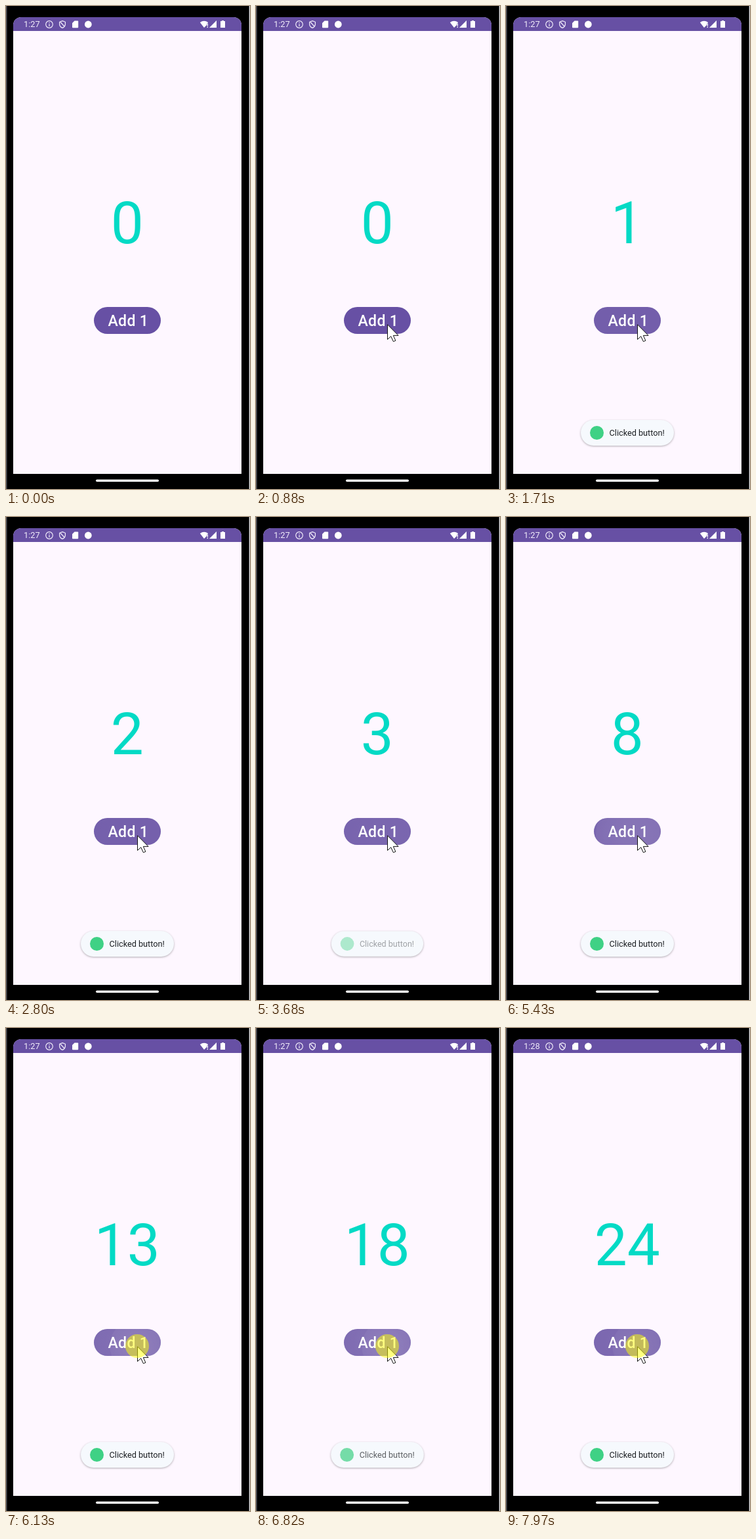
An HTML page that plays this animation: 372x735 px, repeating every 8 s.

```html
<!DOCTYPE html>
<html lang="en">
<head>
<meta charset="utf-8">
<title>Tap counter</title>
<style>
  html, body { margin: 0; width: 100%; height: 100%; overflow: hidden; background: #000; }
  svg { display: block; width: 372px; height: 735px; font-family: Roboto, sans-serif; }
  #count { font-size: 89px; fill: #03dac5; text-anchor: middle; }
  #clock { font-size: 12.8px; fill: #f1ecfa; }
  .label { font-size: 23px; font-weight: 500; letter-spacing: .3px; fill: #fff; }
  .message { font-size: 12.7px; fill: #1b1e21; }
  #toast { transform-origin: 185px 649.5px; }
  .pill { fill: #f6f9fd; filter: drop-shadow(0 1.5px 1.5px rgba(0, 0, 0, .3)); }
</style>
</head>
<body>
<svg viewBox="0 0 372 735">
  <defs>
    <clipPath id="screen"><path d="M11 712V29a12 12 0 0 1 12-12H347a12 12 0 0 1 12 12V712Z"/></clipPath>
    <clipPath id="button"><rect x="134" y="458" width="102" height="41" rx="20.5"/></clipPath>
    <radialGradient id="soft">
      <stop offset=".3" stop-color="#fff"/>
      <stop offset="1" stop-color="#fff" stop-opacity=".6"/>
    </radialGradient>
  </defs>

  <rect width="372" height="735"/>
  <rect width="1.5" height="735" fill="#55555a"/>
  <rect x="370.7" width="1.3" height="735" fill="#e4e4e6"/>
  <g clip-path="url(#screen)">
    <rect x="11" y="17" width="348" height="695" fill="#fef7ff"/>
    <rect x="11" y="17" width="348" height="21" fill="#6750a4"/>
  </g>
  <rect x="137" y="720.5" width="96" height="3.5" rx="1.75" fill="#f4f4f4"/>

  <!-- status bar -->
  <text id="clock" x="27" y="32.3">1:27</text>
  <g fill="none" stroke="#f1ecfa" stroke-width="1.2">
    <circle cx="66" cy="28" r="5.3"/>
    <path d="M66 27.2V31M66 24.7V26"/>
    <path d="M86 22.6L90.4 24.3V27.6Q90.2 31.7 86 33.4Q81.8 31.7 81.6 27.6V24.3ZM83 24.5L89 31"/>
  </g>
  <g fill="#fff">
    <path d="M104.5 22.5H109.2Q110.2 22.5 110.2 23.5V32.3Q110.2 33.3 109.2 33.3H102Q101 33.3 101 32.3V26Z"/>
    <circle cx="125.3" cy="28" r="5.4"/>
    <path d="M295.8 25Q302 20.5 308.2 25L306 27.7V29L302 33Z"/>
    <path d="M306.6 26.7H308V30.6H306.6ZM306.6 31.6H308V33H306.6Z"/>
    <path d="M321 22V33H310Z"/>
    <path d="M329 23V22H332V23H334V33H327V23Z"/>
  </g>

  <text id="count" x="184.8" y="361.3">0</text>

  <g clip-path="url(#button)">
    <rect x="134" y="458" width="102" height="41" fill="#6750a4"/>
    <rect id="hover" x="134" y="458" width="102" height="41" fill="#fff"/>
    <g id="ripples" fill="url(#soft)"></g>
  </g>
  <text class="label" x="155.5" y="487.2">Add 1</text>

  <g id="toast">
    <rect class="pill" x="114" y="630" width="142" height="39" rx="19.5"/>
    <g id="content">
      <circle cx="138.5" cy="649.5" r="10.5" fill="#3fd185"/>
      <text class="message" x="157.6" y="654.3">Clicked button!</text>
    </g>
  </g>

  <path id="cursor" d="M.5 .8V23.4L5.7 18.6 9.4 26.6 12.8 25.2 9.3 17.4H17Z"
        fill="#fff" stroke="#111" stroke-width="1"/>
  <circle id="press" cx="200" cy="484" r="18" fill="#ff0" fill-opacity=".5"/>
</svg>
<script>
  const LOOP = 8000;
  const $ = id => document.getElementById(id);
  const clamp = x => Math.min(1, Math.max(0, x));
  const show = (el, on) => el.setAttribute('visibility', on ? 'visible' : 'hidden');

  // Evenly spaced clicks: the moment the counter changes, and the press around it
  const run = (n, start, gap, lead, hold) => Array.from({ length: n }, (_, i) => {
    const at = start + i * gap;
    return { at, down: at - lead, up: at + hold };
  });
  const clicks = [
    ...[1210, 2450, 3470, 4300].flatMap(at => run(1, at, 0, 130, 90)),
    ...run(4, 4840, 150, 20, 75),
    ...run(10, 5510, 140, 20, 75),
    ...run(6, 6964, 192, 20, 75)
  ];
  const toasts = [[1210, 3300], [3520, 6345], [6572, Infinity]];

  for (const click of clicks) {
    click.ripple = document.createElementNS('http://www.w3.org/2000/svg', 'circle');
    click.ripple.setAttribute('cx', 200);
    click.ripple.setAttribute('cy', 484);
    $('ripples').append(click.ripple);
  }

  function drawRipple({ ripple, down, up }, t) {
    const age = t - down;
    const fade = clamp((age - Math.max(200, up - down)) / 320);
    ripple.setAttribute('r', 20 + 60 * clamp(age / 225));
    ripple.setAttribute('opacity', .08 * clamp(age / 75) * (1 - fade));
  }

  function drawToast(t) {
    const current = toasts.findLast(([start]) => t >= start);
    show($('toast'), current);
    if (!current) return;
    const age = t - current[0], gone = t - current[1];
    const u = Math.cbrt(clamp(age / 333));
    const grow = u * u * (3 - 2 * u);
    const shrink = clamp(gone / 250) ** 1.5;
    $('toast').style.transform = `scale(${.9 + .1 * (grow - shrink)})`;
    $('toast').style.opacity = clamp(age / 66) * (1 - clamp((gone - 150) / 66));
    $('content').style.opacity = clamp((age - 50) / 283) * (1 - clamp(gone / 100));
  }

  function drawCursor(t) {
    const p = clamp((t - 180) / 700);
    const e = p * p * (3 - 2 * p);
    show($('cursor'), t >= 180);
    $('cursor').setAttribute('transform', `translate(${319 - 119 * e} ${668 - 184 * e})`);
  }

  function draw(t) {
    $('count').textContent = clicks.filter(c => t >= c.at).length;
    $('clock').textContent = t < 7560 ? '1:27' : '1:28';
    $('hover').setAttribute('opacity', .08 * clamp((t - 1080) / 100));
    clicks.forEach(c => drawRipple(c, t));
    show($('press'), clicks.some(c => t >= c.down && t < c.up));
    drawToast(t);
    drawCursor(t);
  }

  const began = performance.now();
  function tick() {
    draw((performance.now() - began) % LOOP);
    requestAnimationFrame(tick);
  }
  tick();
</script>
</body>
</html>
```
